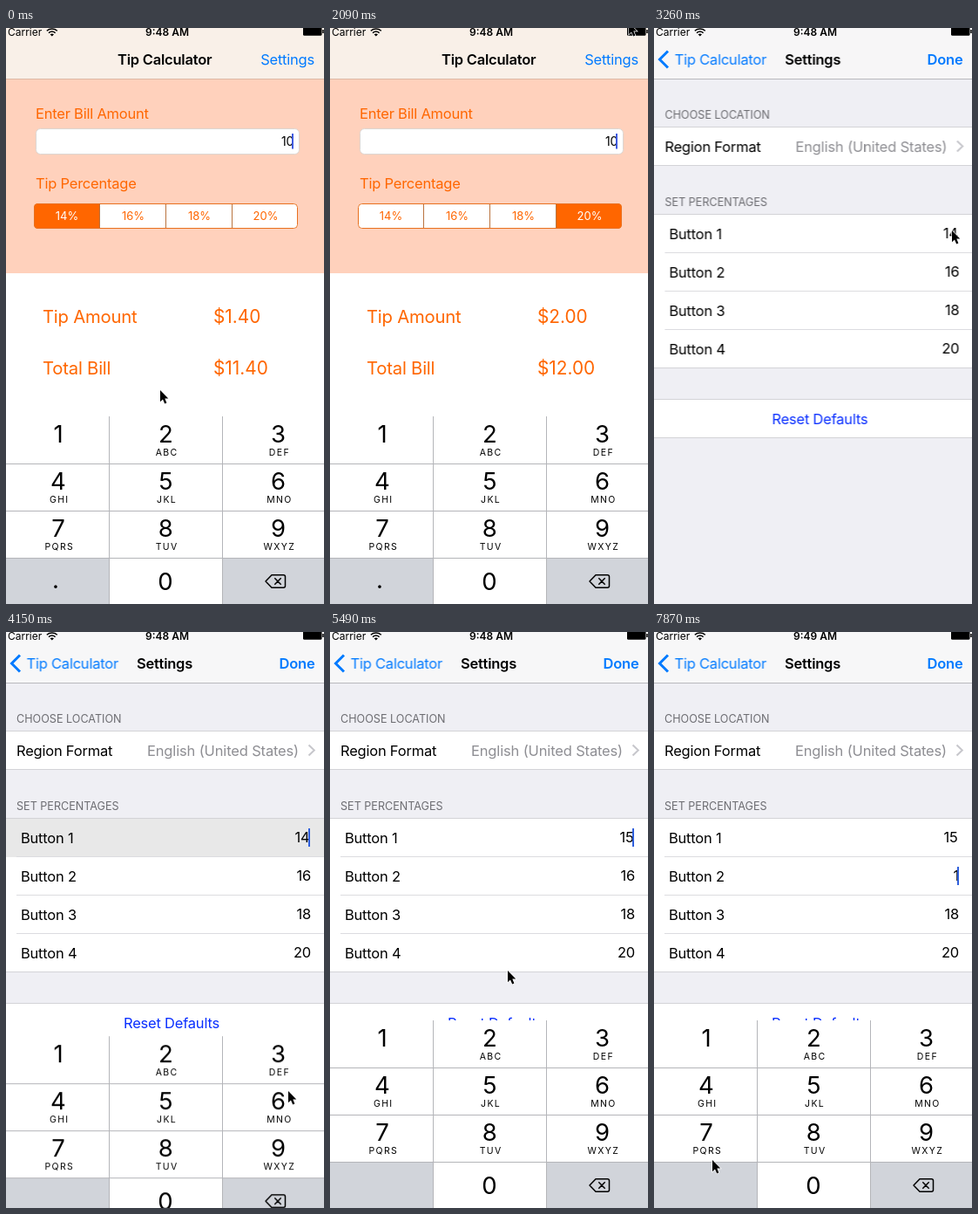
These frames come from a looping animation (365 by 660 pixels, 8000 ms). An HTML page:

```html
<!DOCTYPE html>
<html lang="en">
<head>
<meta charset="utf-8">
<title>Tip Calculator</title>
<style>
html, body { margin: 0; width: 100%; height: 100%; overflow: hidden; background: #fff; }
svg { display: block; width: 365px; height: 660px; overflow: hidden; }
text { font: 400 16.5px Inter, Roboto, sans-serif; letter-spacing: -.22px; }
.bold { font-weight: 600; }
.status { font-size: 12px; letter-spacing: 0; }
.head { font-size: 12.6px; letter-spacing: 0; fill: #6d6d72; }
.orange { fill: #ff6600; }
.blue { fill: #007aff; }
.big { font-size: 20.3px; }
.amount { font-size: 20.8px; letter-spacing: 0; }
.small { font-size: 13px; letter-spacing: 0; }
.digit { font-size: 27.5px; letter-spacing: 0; }
.abc { font-size: 10.5px; letter-spacing: 1.35px; }
</style>
</head>
<body>
<svg viewBox="0 0 365 660" xmlns="http://www.w3.org/2000/svg">
  <defs>
    <clipPath id="pill"><rect x="32" y="201" width="303" height="29" rx="4.5"/></clipPath>
    <linearGradient id="shade"><stop stop-opacity="0"/><stop offset="1" stop-opacity=".3"/></linearGradient>
  </defs>
  <rect width="365" height="660" fill="#fff"/>
  <g id="main"></g>
  <rect id="dim" y="58" width="365" height="387"/>
  <g id="mainPad"></g>
  <g id="settings"></g>
  <g id="nav"></g>
  <g id="settingsPad"></g>
  <path id="cursor" d="M0 0V13.2L3 10.4 5.2 15.4 7.4 14.5 5.3 9.6H9.3Z" stroke="#fff" stroke-width="1.3" paint-order="stroke"/>
</svg>
<script>
const LOOP = 8000, STEP = 148, STEPS = 54;
const $ = id => document.getElementById(id);

function add(parent, tag, attrs = {}, content = '') {
  const node = document.createElementNS('http://www.w3.org/2000/svg', tag);
  for (const name in attrs) node.setAttribute(name, attrs[name]);
  node.textContent = content;
  return parent.appendChild(node);
}
const rect = (p, x, y, width, height, fill, more) => add(p, 'rect', { x, y, width, height, fill, ...more });
const line = (p, d, stroke, width = 1, more) =>
  add(p, 'path', { d, stroke, 'stroke-width': width, fill: 'none', ...more });
const text = (p, x, y, content, cls = '', anchor = 'start', more) =>
  add(p, 'text', { x, y, class: cls, 'text-anchor': anchor, ...more }, content);

// Samples rule(k) once per step and holds each value
function track(node, prop, rule) {
  const frames = Array.from({ length: STEPS }, (_, k) =>
    ({ offset: k * STEP / LOOP, [prop]: rule(k), easing: 'step-end' }));
  frames.push({ offset: 1, [prop]: rule(STEPS - 1) });
  node.animate(frames, { duration: LOOP, iterations: Infinity });
}
const fade = (node, rule) => track(node, 'opacity', rule);
const move = (node, rule) => track(node, 'transform', k => `translate(${rule(k).map(v => v + 'px')})`);
const show = (node, from, to = STEPS) => fade(node, k => +(k >= from && k < to));
const blink = (node, from, to = STEPS, since = 0) => fade(node, k => {
  const phase = (k - since) * STEP / 1000 % 1;
  return +(k >= from && k < to && (phase < .5 || phase > .8));
});
const mix = (a, b, p) => a + (b - a) * p;
const spring = (k, rate) => k <= 0 ? 0 : 1 - (1 + rate * k) * Math.exp(-rate * k);
const push = k => spring(k - 18, 2.28);
const slide = (node, from, to) => move(node, k => [mix(from, to, push(k)), 0]);

// Moments of the taps, in steps
const PICKS = [-2, 4, 8, 11], OPEN = 17, EDIT = 26, ERASE = 31, TYPE = 36, NEXT = 43, ERASE_NEXT = 50;

function keypad(parent, hasDot) {
  rect(parent, -1, 445, 367, 216, '#fff');
  rect(parent, -1, 607, 119, 54, '#d1d4da');
  const erase = rect(parent, 248, 607, 118, 54, '#d1d4da');
  line(parent, 'M0 499.5H365M0 553.5H365M0 607.5H365M118.5 445V660M248.5 445V660', '#b4b5b9');
  ['', 'ABC', 'DEF', 'GHI', 'JKL', 'MNO', 'PQRS', 'TUV', 'WXYZ'].forEach((abc, i) => {
    const x = 60 + 126.3 * (i % 3) - 3 * (i % 3 === 1), y = 475 + 54 * Math.floor(i / 3);
    text(parent, x, y, i + 1, 'digit', 'middle');
    text(parent, x + 1.3, y + 15, abc, 'abc', 'middle');
  });
  text(parent, 183, 644, '0', 'digit', 'middle');
  if (hasDot) text(parent, 57, 642, '.', 'digit', 'middle');
  line(parent, 'M298 634L305 626.8H318.5Q320.5 626.8 320.5 628.8V639.2Q320.5 641.2 318.5 641.2H305ZM308.3 630.3L315.7 637.7M315.7 630.3L308.3 637.7',
    '#000', 1.5, { 'stroke-linejoin': 'round' });
  return erase;
}

// Calculator screen
const main = $('main');
rect(main, 0, 58, 365, 223, '#ffd1bc');
text(main, 34, 104, 'Enter Bill Amount', 'orange');
rect(main, 34.5, 115.5, 302, 29, '#fff', { rx: 5, stroke: '#dcd6d2' });
text(main, 330, 135, '10', '', 'end', { style: 'font-size:14px' });
blink(rect(main, 328, 121, 2, 17.5, '#3f5be0'), 0);
text(main, 34, 184, 'Tip Percentage', 'orange');
text(main, 42, 338, 'Tip Amount', 'big orange');
text(main, 42, 397, 'Total Bill', 'big orange');

const segments = add(main, 'g', { 'clip-path': 'url(#pill)' });
PICKS.forEach((start, i) => {
  const x = 32 + 76 * i, rate = 14 + 2 * i, end = PICKS[i + 1] ?? STEPS;
  rect(segments, x, 201, 76, 29, '#fff');
  text(segments, x + 38, 220, rate + '%', 'small orange', 'middle');
  const pick = add(segments, 'g');
  rect(pick, x, 201, 76, 29, '#ff6600');
  text(pick, x + 38, 220, rate + '%', 'small', 'middle', { fill: '#fff' });
  fade(pick, k => k < start || k > end ? 0 : k === start ? .27 : k === end ? .85 : 1);

  const tip = rate / 10;
  show(text(main, 238, 338, '$' + tip.toFixed(2), 'amount orange'), start, end);
  show(text(main, 238, 397, '$' + (10 + tip).toFixed(2), 'amount orange'), start, end);
});
line(main, 'M107.5 202V229M183.5 202V229M259.5 202V229', '#b9733f');
rect(main, 32.5, 201.5, 302, 28, 'none', { rx: 4, stroke: '#e8701f' });
keypad($('mainPad'), true);

// Settings screen; backgrounds reach a little past the left edge
const page = $('settings');
rect(page, -14, 58, 10, 602, 'url(#shade)');
rect(page, -4, 58, 370, 602, '#efeff4');
[[113, 44], [213, 176], [425, 44]].forEach(([y, h]) => {
  rect(page, -4, y, 370, h, '#fff');
  line(page, `M-4 ${y + .5}H366M-4 ${y + h + .5}H366`, '#d3d3d7');
});
text(page, 12, 103.5, 'CHOOSE LOCATION', 'head');
text(page, 12, 141.5, 'Region Format');
text(page, 336, 141.5, 'English (United States)', '', 'end', { fill: '#8e8e93', style: 'letter-spacing:-.15px' });
line(page, 'M347.5 129.5L353.8 135.5 347.5 141.5', '#c7c7cc', 2);
text(page, 12, 203.5, 'SET PERCENTAGES', 'head');
fade(rect(page, -4, 214, 370, 44, '#d9d9d9'), k => k < EDIT ? 0 : Math.max(0, 1 - (k - EDIT) / 5));
line(page, 'M12 257.5H366M12 301.5H366M12 345.5H366', '#dcdce0');
const rows = [
  { 14: [0, ERASE], 1: [ERASE, TYPE], 15: [TYPE] },
  { 16: [0, ERASE_NEXT], 1: [ERASE_NEXT] },
  { 18: [0] },
  { 20: [0] }
];
rows.forEach((versions, i) => {
  const y = 242 + 44 * i;
  text(page, 17, y, 'Button ' + (i + 1));
  for (const value in versions)
    show(text(page, i ? 350 : 348.5, y - .7, value, '', 'end'), ...versions[value]);
});
blink(rect(page, 347, 225, 2, 21, '#2f5fdc'), EDIT, NEXT);
blink(rect(page, 348, 269, 2, 21, '#2f5fdc'), NEXT, STEPS, NEXT);
text(page, 190, 454, 'Reset Defaults', '', 'middle', { fill: '#0a2fff' });

// Navigation and status bar
const nav = $('nav');
rect(nav, 0, 0, 365, 58, '#f9f0e8');
line(nav, 'M0 58.5H365', '#dcb8a4');
const bar = add(nav, 'g');
rect(bar, 0, 0, 365, 58, '#f7f7f8');
line(bar, 'M0 58.5H365', '#b9b9bd');
const title = text(nav, 0, 42, 'Tip Calculator', 'bold');
const back = text(nav, 0, 42, 'Tip Calculator', 'blue');
const heading = text(nav, 0, 42, 'Settings', 'bold');
const open = text(nav, 354, 42, 'Settings', 'blue', 'end');
const done = text(nav, 354.5, 42, 'Done', 'bold blue', 'end');
const chevron = line(nav, 'M16 26.5L6.5 36 16 45.5', '#007aff', 3);
text(nav, 2, 9, 'Carrier', 'status');
line(nav, 'M46.8 3.2A9 9 0 0 1 58.8 3.2M49 5.6A6 6 0 0 1 56.6 5.6', '#000', 1.5);
add(nav, 'path', { d: 'M50.6 7.3A3.6 3.6 0 0 1 55 7.3L52.8 9.5Z' });
show(text(nav, 185, 9, '9:48 AM', 'status bold', 'middle'), 0, 48);
show(text(nav, 185, 9, '9:49 AM', 'status bold', 'middle'), 48);
rect(nav, 341, -1, 21.5, 9.8, '#000', { rx: 1.5 });
rect(nav, 363.2, 2, 1.5, 4, '#000');

// Push transition
[main, $('mainPad')].forEach(node => slide(node, 0, -112));
slide(page, 382, 0);
[title, back].forEach(node => slide(node, 128, 23.5));
slide(heading, 365, 150);
[bar, heading, done, back].forEach(node => fade(node, push));
fade($('dim'), k => .11 * push(k));
fade(title, k => Math.max(0, 1 - 1.1 * push(k)));
fade(open, k => k < OPEN ? 1 : .3 * (1 - push(k)));
fade(chevron, k => push(k) ** 14);

// Second keypad
const erase = keypad($('settingsPad'), false);
move($('settingsPad'), k => [0, 215 * (1 - spring(k - EDIT, 2.05))]);
track(erase, 'fill', k => k === ERASE || k === ERASE_NEXT ? '#fff' : '#d1d4da');

// Pointer: eased glides from one stop to the next
const segment = i => [71 + 77 * i, 212], button = [322, 38], row = [342, 232], eraseKey = [311, 632];
const stops = [
  [0, [177, 415]], [PICKS[1], segment(1)], [PICKS[2], segment(2)], [PICKS[3], segment(3)],
  [14, [343, -6]], [OPEN, button], [18, button], [20, [346, 142]], [22, row], [EDIT, row],
  [28, [324, 526]], [30, eraseKey], [33, eraseKey], [TYPE - 1, [204, 528]], [37, [204, 388]],
  [40, [285, 140]], [NEXT, [336, 276]], [46, [343, 299]], [49, eraseKey], [ERASE_NEXT, eraseKey],
  [53, [67, 605]]
];
move($('cursor'), k => {
  const i = Math.max(1, stops.findIndex(stop => stop[0] >= k));
  const [start, from] = stops[i - 1], [end, to] = stops[i];
  const p = (k - start) / (end - start), eased = p * p * (3 - 2 * p);
  return from.map((v, axis) => mix(v, to[axis], eased));
});
</script>
</body>
</html>
```
